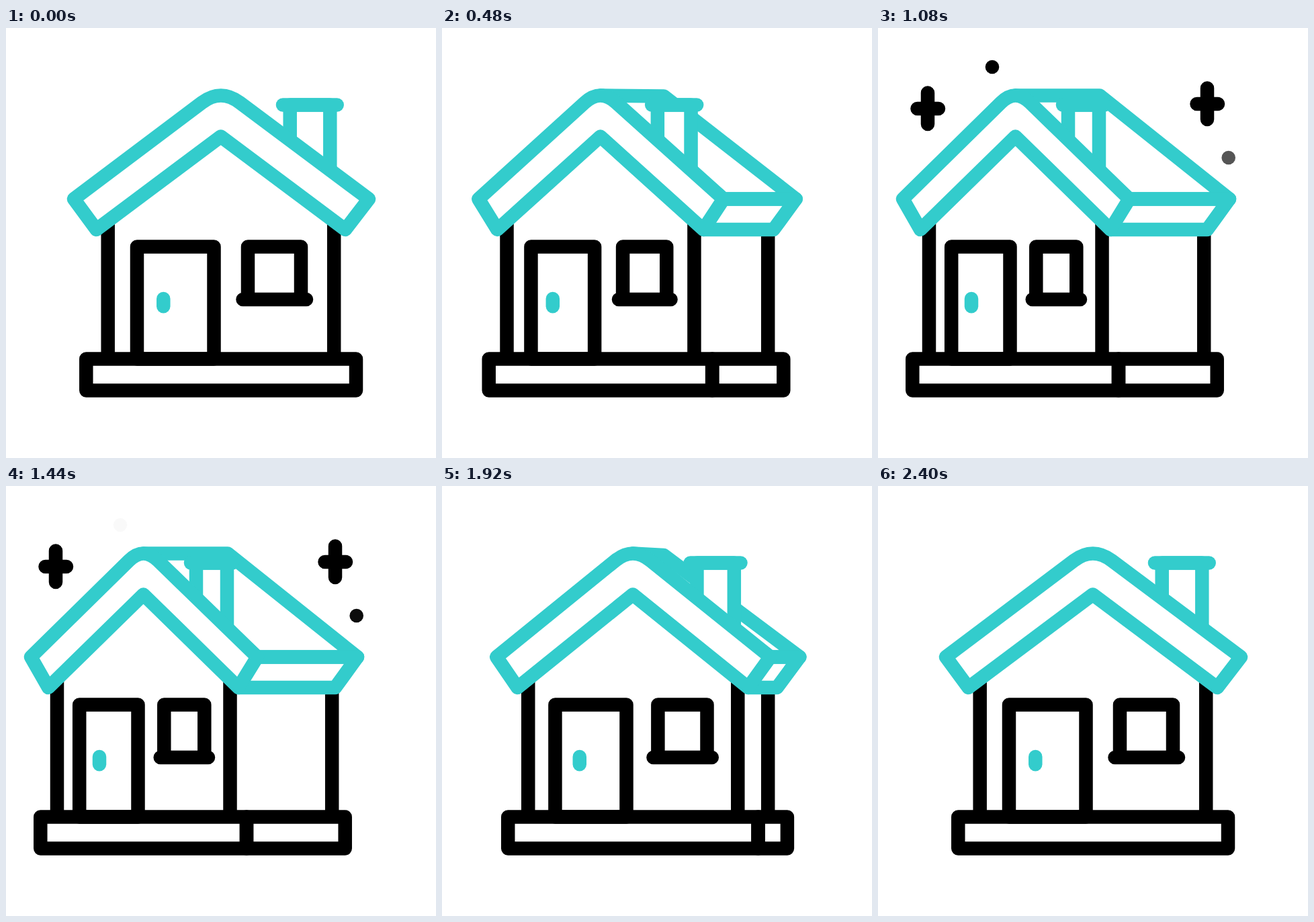
Write an HTML page that moves like this. It is 640 px wide and 640 px high and loops after 3000 ms.

```html
<!DOCTYPE html>
<html lang="en">
<head>
<meta charset="utf-8">
<title>Turning house</title>
<style>
  html, body { margin: 0; width: 100%; height: 100%; overflow: hidden; background: #fff; }
  svg { display: block; width: 100%; height: 100%; }
  path { fill: none; stroke: #000; stroke-width: 20.5; stroke-linecap: round; stroke-linejoin: round; }
  .teal { stroke: #33cccc; }
  .solid { fill: #fff; }
  .butt { stroke-linecap: butt; }
</style>
</head>
<body>
<svg viewBox="0 0 640 640">
  <g id="back">
    <path id="sideWall" class="butt"/>
    <path id="sideBase"/>
    <path id="sideRoof" class="teal solid"/>
    <path id="eave" class="teal"/>
  </g>
  <path id="stack" class="teal solid butt"/>
  <path id="cap" class="teal"/>
  <path id="walls" class="butt"/>
  <path id="base"/>
  <path id="door"/>
  <path id="handle" class="teal"/>
  <path id="pane"/>
  <path id="roof" class="teal solid"/>
  <path id="plusL" d="M74 96.5V143M58.5 120H90"/>
  <path id="plusR" d="M490 89.5V136M474.5 113H506"/>
  <circle id="dotL" cx="170" cy="58" r="10.3"/>
  <circle id="dotR" cx="521.7" cy="193" r="10.3"/>
</svg>
<script>
const LOOP = 3000, STEP = 40;
const el = {};
document.querySelectorAll('[id]').forEach(n => el[n.id] = n);

// fade in from a to b, fade out from c to d
const fades = {
  plusL: [880, 1000, 1500, 1620],
  plusR: [920, 1040, 1520, 1640],
  dotL: [920, 1040, 1320, 1443],
  dotR: [1000, 1120, 1434, 1560]
};

const clamp = v => Math.min(1, Math.max(0, v));

// cubic-bezier(x1, 0, x2, 1)
function ease(u, x1, x2) {
  u = clamp(u);
  let lo = 0, hi = 1;
  for (let i = 0; i < 24; i++) {
    const s = (lo + hi) / 2, r = 1 - s;
    const x = 3 * r * r * s * x1 + 3 * r * s * s * x2 + s * s * s;
    if (x < u) lo = s; else hi = s;
  }
  return lo * lo * (3 - 2 * lo);
}

const turnAt = t => t < 1600
  ? ease(t / 1030, 0.4, 0.2)
  : 1 - ease((t - 1600) / 800, 0.41, 0.1);

function draw(t) {
  const p = t >= 2400 ? 0 : turnAt(t);
  const mix = (a, b) => +(a + (b - a) * p).toFixed(2);
  const set = (id, d) => el[id].setAttribute('d', d);
  const box = (l, top, r, bottom) => `M${l} ${top}H${r}V${bottom}H${l}Z`;

  // front gable
  const apex = mix(319.7, 204.5);
  const left = mix(101, 37), right = mix(540, 374);
  const footL = mix(134.5, 63), footR = mix(505, 346);
  const bend = x => apex + (x - apex) * 0.128;
  set('roof', `M${left} 254.5L${bend(left)} 111Q${apex} 90 ${bend(right)} 111` +
    `L${right} 254.5L${footR} 300L${apex} 161.5L${footL} 300Z`);
  set('walls', `M${mix(151.7, 76)} 287V492M${mix(488.2, 333.5)} 287V492`);
  const baseR = mix(521, 358);
  set('base', box(mix(119.3, 51.3), 492.5, baseR, 539.5));
  set('door', box(mix(195, 109.2), 325.5, mix(309.5, 196.5), 492.5));
  set('handle', `M${mix(234.3, 139)} 403V414.3`);
  set('pane', box(mix(360, 235.3), 325.5, mix(439, 295.3), 404) +
    `M${mix(352.5, 229.7)} 404H${mix(447, 301)}`);

  // side
  const peak = mix(104, 100.5), tip = mix(536.5, 523), foot = mix(502.5, 490);
  el.back.style.display = p > 0.001 ? '' : 'none';
  set('sideRoof', `M${apex} 100.5L330 ${peak}L${tip} 254.5H${right}Z`);
  set('eave', `M${right} 254.5H${tip}L${foot} 300H${footR}`);
  set('sideWall', 'M485.2 300V492');
  set('sideBase', box(baseR, 492.5, mix(518, 504.7), 539.5));

  // chimney
  const c1 = mix(422.7, 283), c2 = mix(482.3, 329);
  set('stack', `M${c1} 167V114.5H${c2}V211`);
  set('cap', `M${mix(412, 275)} 114.5H${mix(492.7, 337)}`);

  for (const id in fades) {
    const [a, b, c, d] = fades[id];
    el[id].style.opacity = Math.min(clamp((t - a) / (b - a)), clamp((d - t) / (d - c)));
  }
}

let start;
function tick(now) {
  if (start === undefined) start = now;
  const t = (now - start) % LOOP;
  draw(Math.floor(t / STEP) * STEP);
  requestAnimationFrame(tick);
}
draw(0);
requestAnimationFrame(tick);
</script>
</body>
</html>
```
